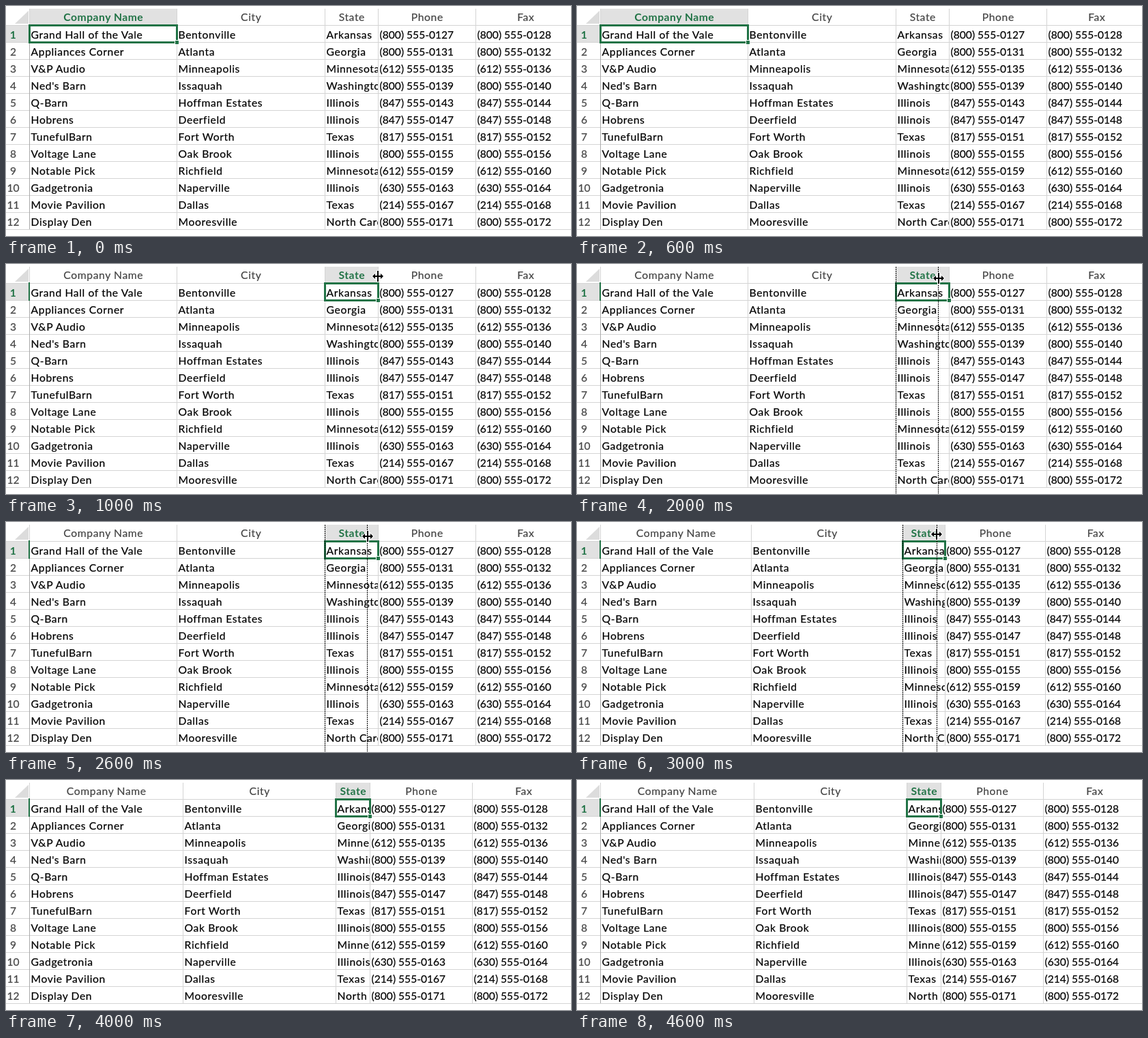
An HTML page that plays this animation: 828x338 px, repeating every 5000 ms.

```html
<!DOCTYPE html>
<html lang="en">
<head>
<meta charset="utf-8">
<title>Column resize</title>
<style>
  html, body { margin: 0; width: 100%; height: 100%; overflow: hidden; background: #fff; }
  svg { display: block; }
  text {
    font: 15.7px Lato, Carlito, "Open Sans", sans-serif; letter-spacing: .6px;
    fill: #000; stroke: #000; stroke-width: .2px;
  }
  .num { font-size: 15.6px; letter-spacing: 0; }
  .head { fill: #444; stroke: #444; text-anchor: middle; }
  .on { fill: #217346; stroke: none; font-weight: bold; letter-spacing: .5px; }
</style>
</head>
<body>
<svg id="sheet" width="828" height="338" viewBox="0 0 828 338"></svg>
<script>
const GREEN = '#217346', GRID = '#d4d4d4', SHADE = '#e1e1e1';
const TOP = 4, HEAD = 28, ROW = 25, STEP_MS = 1000;
const titles = ['Company Name', 'City', 'State', 'Phone', 'Fax'];
const records = [
  ['Grand Hall of the Vale', 'Bentonville', 'Arkansas', 800],
  ['Appliances Corner', 'Atlanta', 'Georgia', 800],
  ['V&P Audio', 'Minneapolis', 'Minnesota', 612],
  ["Ned's Barn", 'Issaquah', 'Washington', 800],
  ['Q-Barn', 'Hoffman Estates', 'Illinois', 847],
  ['Hobrens', 'Deerfield', 'Illinois', 847],
  ['TunefulBarn', 'Fort Worth', 'Texas', 817],
  ['Voltage Lane', 'Oak Brook', 'Illinois', 800],
  ['Notable Pick', 'Richfield', 'Minnesota', 612],
  ['Gadgetronia', 'Naperville', 'Illinois', 630],
  ['Movie Pavilion', 'Dallas', 'Texas', 214],
  ['Display Den', 'Mooresville', 'North Carolina', 800]
];
const dial = (area, n) => `(${area}) 555-01${n}`;
const rows = records.map(([name, city, state, area], i) =>
  [name, city, state, dial(area, 27 + 4 * i), dial(area, 28 + 4 * i)]);
const BOTTOM = HEAD + ROW * rows.length;

// Column edges, selected column, cursor position and dotted guides per step.
const wide = [34, 250, 467, 545, 688, 834];
const steps = [
  { edges: wide, pick: 0 },
  { edges: wide, pick: 2, cursor: [545, 18] },
  { edges: wide, pick: 2, cursor: [530, 21], guides: [467, 529] },
  { edges: [34, 255, 477, 539, 686, 833], pick: 2, cursor: [527, 18], guides: [477, 527] },
  { edges: [34, 259, 483, 533, 683, 833], pick: 2 }
];

const sheet = document.getElementById('sheet');

function add(tag, attrs, parent = sheet) {
  const el = document.createElementNS('http://www.w3.org/2000/svg', tag);
  for (const key in attrs) el.setAttribute(key, attrs[key]);
  return parent.appendChild(el);
}
const box = (x, y, width, height, fill) => add('rect', { x, y, width, height, fill });
function label(x, y, str, cls, parent) {
  add('text', { x, y, class: cls }, parent).textContent = str;
}

function drawHeaders(edges, pick) {
  const left = edges[pick];
  add('path', { d: 'M33 7V26H13Z', fill: '#dcdcdc' });
  box(left, TOP, edges[pick + 1] - left, HEAD - TOP, SHADE);
  box(0, HEAD, 34, ROW, SHADE);
  titles.forEach((title, c) => {
    label((edges[c] + edges[c + 1]) / 2 + .8, 22, title, c === pick ? 'head on' : 'head');
  });
  rows.forEach((_, r) => {
    label(10.5, 48 + ROW * r, r + 1, r ? 'head num' : 'head num on');
  });
}

function drawGrid(edges) {
  for (let y = HEAD; y <= BOTTOM; y += ROW) box(0, y, 828, 1, GRID);
  edges.slice(0, 5).forEach(x => box(x, TOP, 1, BOTTOM - TOP, GRID));
  box(34, HEAD, 1, BOTTOM - HEAD, '#ababab');
}

function drawCells(edges) {
  edges.slice(0, 5).forEach((x, c) => {
    const clip = add('svg', { x, y: HEAD, width: edges[c + 1] - x, height: BOTTOM - HEAD });
    rows.forEach((row, r) => label(2.6, 20 + ROW * r, row[c], c > 2 ? 'num' : '', clip));
  });
}

function drawSelection(left, right) {
  const bottom = HEAD + ROW;
  box(33, HEAD - 1, 2, ROW + 2, GREEN);
  add('rect', {
    x: left + .5, y: HEAD + .5, width: right - left, height: ROW,
    fill: 'none', stroke: GREEN, 'stroke-width': 3
  });
  box(right - 3, bottom - 3, 6, 6, '#fff');
  box(right - 2, bottom - 2, 5, 5, GREEN);
}

function drawGuide(x) {
  add('path', { d: `M${x + .5} ${TOP}V338`, stroke: '#000', 'stroke-dasharray': '2 1' });
}

function drawCursor([x, y]) {
  const d = 'M-1-8h2v7h3v-3l4 4-4 4v-3h-3v7h-2v-7h-3v3l-4-4 4-4v3h3z';
  add('path', {
    d, transform: `translate(${x} ${y})`,
    fill: '#000', stroke: '#fff', 'stroke-width': 2, 'paint-order': 'stroke'
  });
}

function draw({ edges, pick, cursor, guides = [] }) {
  sheet.replaceChildren();
  drawHeaders(edges, pick);
  drawGrid(edges);
  drawCells(edges);
  drawSelection(edges[pick], edges[pick + 1]);
  guides.forEach(drawGuide);
  if (cursor) drawCursor(cursor);
}

let shown = -1;
const start = performance.now();
function tick() {
  const step = Math.floor((performance.now() - start) / STEP_MS) % steps.length;
  if (step !== shown) draw(steps[shown = step]);
  requestAnimationFrame(tick);
}
tick();
</script>
</body>
</html>
```
